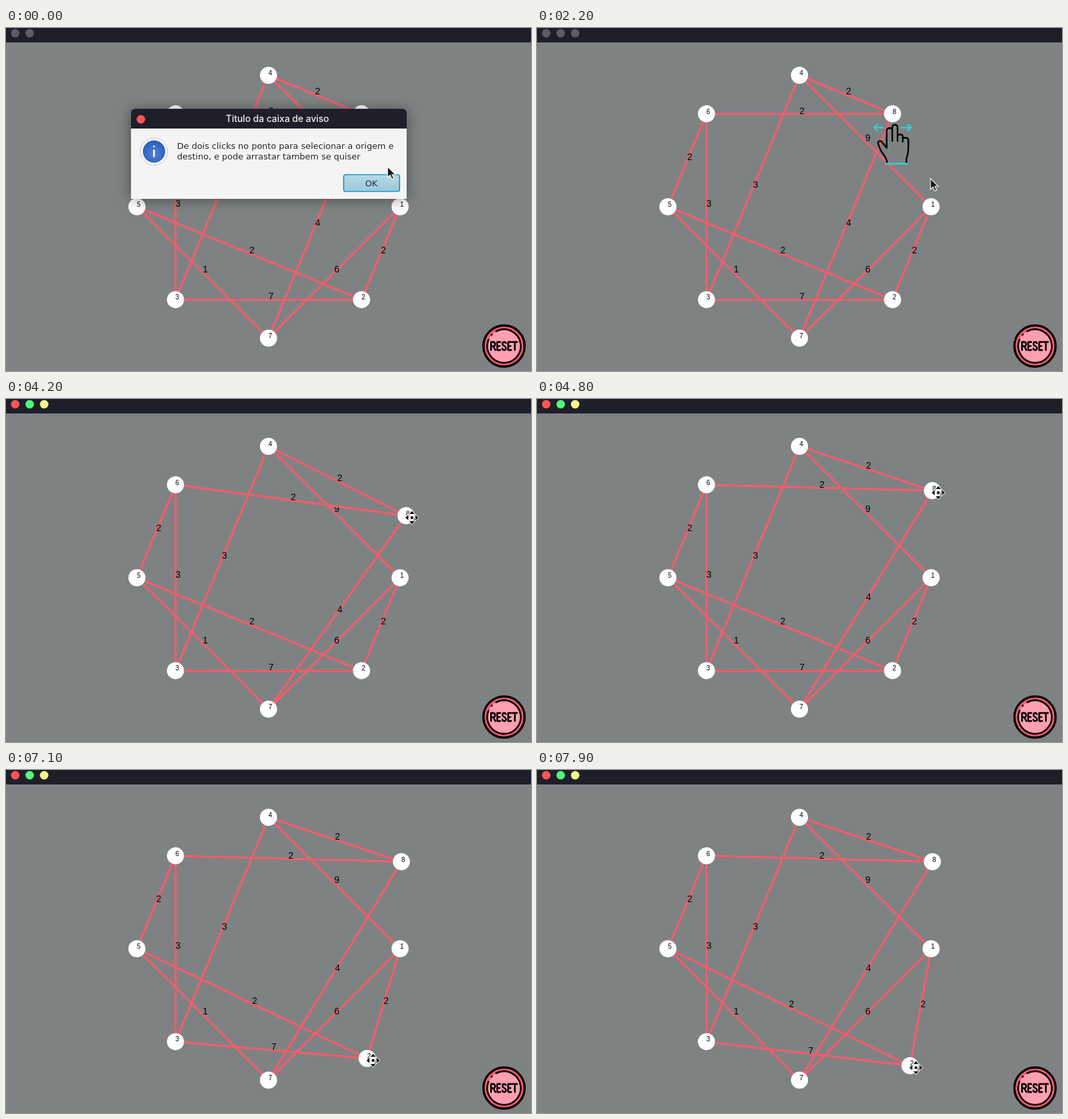
Write an HTML page that moves like this. It is 798 px wide and 522 px high and loops after 8000 ms.

```html
<!DOCTYPE html>
<html lang="pt">
<head>
<meta charset="utf-8">
<title>Grafo</title>
<style>
html, body { margin: 0; width: 100%; height: 100%; overflow: hidden; background: #7e8283; }
svg { display: block; width: 100vw; height: 100vh; }
.weight { font: 14px "Liberation Sans", sans-serif; }
.name { font: 10px "Liberation Sans", sans-serif; }
.title { font: 500 14px Inter, sans-serif; fill: #f4f4f2; text-anchor: middle; }
.msg { font: 13px "DejaVu Sans", sans-serif; fill: #22262a; }
.edge { stroke: #ff5a6c; stroke-width: 3; }
</style>
</head>
<body>
<svg viewBox="0 0 798 522" xmlns="http://www.w3.org/2000/svg">
  <defs>
    <linearGradient id="face" x2="0" y2="1">
      <stop id="faceTop"/><stop id="faceBottom" offset="1"/>
    </linearGradient>
    <radialGradient id="blue" cy=".6">
      <stop stop-color="#4f83d8"/><stop offset="1" stop-color="#3262bd"/>
    </radialGradient>
    <filter id="blur" x="-20%" y="-40%" width="140%" height="180%">
      <feGaussianBlur stdDeviation="10"/>
    </filter>
  </defs>
  <rect width="798" height="522" fill="#7e8283"/>
  <rect width="798" height="22" fill="#1f1f29"/>
  <g id="lights"></g>
  <g id="edges"></g>
  <g id="nodes"></g>

  <g id="reset" transform="translate(757 484)" fill="none" stroke="#000" stroke-linecap="round" stroke-linejoin="round">
    <circle r="31.300" fill="#ff5a72" stroke-width="3.400"/>
    <circle r="25.500" fill="#ff9fb0" stroke="none"/>
    <path d="M-12-22.500A25.500 25.500 0 1 1-23.500-10M-19-17L-18.500-17.500" stroke-width="2.600"/>
    <path aria-label="RESET" transform="scale(.94)" stroke-width="2.700" d="M-21 6.500V-6.500H-17.500Q-14.500-6.500-14.500-3T-17.500 .2H-21M-17.500 .2L-14 6.500
      M-6-6.500H-11V6.500H-6M-11 0H-7
      M3-4.500Q2.500-6.500 .3-6.500Q-2.500-6.500-2.500-3.500C-2.500 .5 3.200-.5 3.200 3.500Q3.200 6.500 .3 6.500Q-2.500 6.500-2.700 4
      M11.500-6.500H6.700V6.500H11.500M6.700 0H10.500M14-6.500H21M17.500-6.500V6.500"/>
  </g>

  <g id="hand" fill="none" stroke="#000" stroke-width="2.400" stroke-linejoin="round" stroke-linecap="round">
    <path d="M532 205C532 196 525 193 521 183L518.500 176C517.500 171.500 523 170.500 525 174.500L531.500 182.500V156
      C531.500 151 540 151 540 156V172M540 156V151C540 146 548 146 548 151V172M548 165C548 161 556 161 556 165V173
      M556 169C556 166 564.500 166 564.500 171C564.500 184 565 190 562.500 195Q561 199 561.500 205"/>
    <path d="M530 206.500H563M526 151.500H512.500M517 147L512.500 151.500L517 156M553.500 151.500H568.500M564 147L568.500 151.500L564 156" stroke="#35d0d3"/>
  </g>

  <g id="dialog">
    <rect x="190" y="125" width="419" height="136" fill="#000" opacity=".42" filter="url(#blur)"/>
    <path d="M190 260V129Q190 123 196 123H603Q609 123 609 129V260Z" fill="#f4f4f4"/>
    <path d="M190 153V129Q190 123 196 123H603Q609 123 609 129V153Z" fill="#1f1f29"/>
    <circle cx="205" cy="139" r="6.500" fill="#ff5555"/>
    <text class="title" x="412.500" y="143">Titulo da caixa de aviso</text>
    <circle cx="225" cy="188" r="20.500" fill="#fdfdfd" stroke="#c4c4c4"/>
    <circle cx="225" cy="188" r="17" fill="url(#blue)"/>
    <path d="M225 185V196.500M225 179V181.500" stroke="#fff" stroke-width="2.600"/>
    <text class="msg" x="260" y="184">De dois clicks no ponto para selecionar a origem e</text>
    <text class="msg" x="260" y="200">destino, e pode arrastar tambem se quiser</text>
    <rect x="513.250" y="223.250" width="85" height="25.500" rx="3" fill="url(#face)" stroke="#1f97c7" stroke-width="1.700"/>
    <text class="msg" x="555.500" y="241" text-anchor="middle">OK</text>
  </g>

  <path id="arrow" d="M0 0V16.500L3.900 13L6.600 19L9.400 17.800L6.800 12H12Z" fill="#1b1b1b" stroke="#fff" stroke-width="1.100"/>
  <g id="mover" fill="#111" stroke="#fff" stroke-width="1.500" paint-order="stroke">
    <circle r="2.300"/>
  </g>
</svg>
<script>
const LOOP = 8000, STEP = 100;
const CENTER = [399, 272], RADIUS = 200;
const $ = id => document.getElementById(id);

function add(parent, tag, attrs, text = "") {
  const el = document.createElementNS("http://www.w3.org/2000/svg", tag);
  set(el, attrs);
  el.textContent = text;
  return parent.appendChild(el);
}
function set(el, attrs) {
  for (const k in attrs) el.setAttribute(k, attrs[k]);
}
const show = (el, on) => set(el, { display: on ? "inline" : "none" });
const place = (el, [x, y]) => set(el, { transform: `translate(${x} ${y})` });
const clamp = v => Math.max(0, Math.min(1, v));
const easeOut = p => 1 - (1 - p) ** 3;

// Nodes sit clockwise on a circle, starting at the right.
const nodes = {};
[..."12735648"].forEach((id, i) => {
  const a = i * Math.PI / 4;
  const el = add($("nodes"), "g", {});
  add(el, "circle", { r: 13, fill: "#fff" });
  add(el, "text", { class: "name" }, id);
  const home = [CENTER[0] + RADIUS * Math.cos(a), CENTER[1] + RADIUS * Math.sin(a)];
  nodes[id] = { el, home, at: home };
});

// Each edge: start node, end node, weight.
const edges = "482 419 433 682 652 633 522 571 327 874 176 122".split(" ")
  .map(([from, to, weight]) => ({
    from: nodes[from], to: nodes[to],
    line: add($("edges"), "line", { class: "edge" }),
    label: add($("edges"), "text", { class: "weight" }, weight)
  }));

const lights = ["#ff5555", "#50fa7b", "#f4f98c"].map((color, i) => ({
  color, el: add($("lights"), "circle", { cx: 14 + 22 * i, cy: 8, r: 6.5 })
}));

for (let turn = 0; turn < 360; turn += 90)
  add($("mover"), "path", { d: "M0-10L4-5.500H-4Z", transform: `rotate(${turn})` });

// Pointer script: the pointer eases to each goal and rests there.
// A move with a drag carries that node along, held at the grab offset.
const GRAB = [9, 3];
const grip = id => nodes[id].home.map((v, i) => v + GRAB[i]);
const origin = [580, 211];
const moves = [
  { from: 0, to: 300, goal: [586, 235] },
  { from: 400, to: 500, goal: [566, 236] },
  { from: 1500, to: 2200, goal: [598, 229] },
  { from: 2200, to: 2500, goal: [566, 165] },
  { from: 2800, to: 3700, goal: grip(8) },
  { from: 3700, to: 4200, goal: [617, 180.5], drag: 8 },
  { from: 4200, to: 4900, goal: [610, 142.5], drag: 8 },
  { from: 5400, to: 6000, goal: [525, 421] },
  { from: 6100, to: 6300, goal: grip(2) },
  { from: 7000, to: 7100, goal: [558, 442], drag: 2 },
  { from: 7100, to: 7500, goal: [604, 461], drag: 2 },
  { from: 7500, to: 7900, goal: [576, 453], drag: 2 }
];

// Replays the script up to t; sets the node places, returns the pointer's.
function runScript(t) {
  let at = origin;
  for (const id in nodes) nodes[id].at = nodes[id].home;
  for (const { from, to, goal, drag } of moves) {
    if (t <= from) break;
    const p = easeOut(clamp((t - from) / (to - from)));
    at = at.map((v, i) => v + (goal[i] - v) * p);
    if (drag) nodes[drag].at = at.map((v, i) => v - GRAB[i]);
  }
  return at;
}

function drawGraph() {
  for (const id in nodes) place(nodes[id].el, nodes[id].at);
  for (const { from, to, line, label } of edges) {
    const [x1, y1] = from.at, [x2, y2] = to.at;
    set(line, { x1, y1, x2, y2 });
    set(label, { x: (x1 + x2) / 2, y: (y1 + y2) / 2 });
  }
}

function drawDialog(t) {
  const fade = clamp((t - 1400) / 300);
  const s = 1 - 0.15 * fade;
  const [top, bottom] = t >= 1200 ? ["#a9cfdf", "#92bccd"]
    : t >= 200 ? ["#c3e5f1", "#a9d4e5"] : ["#b4dae8", "#9bc8db"];
  set($("faceTop"), { "stop-color": top });
  set($("faceBottom"), { "stop-color": bottom });
  show($("dialog"), fade < 1);
  set($("dialog"), {
    opacity: 1 - fade,
    transform: `translate(${399.5 * (1 - s)} ${191.5 * (1 - s)}) scale(${s})`
  });
}

function draw(t) {
  const at = runScript(t);
  drawGraph();
  drawDialog(t);

  const active = t >= 3800;
  lights.forEach(({ el, color }) => set(el, { fill: active ? color : "#5d5c67" }));
  show(lights[2].el, t >= 1500);

  show($("hand"), t >= 1700 && !active);
  place($("hand"), [-6 * Math.sin((t - 2200) / 1200 * 2 * Math.PI), 0]);

  const moving = (t >= 3500 && t < 5500) || t >= 6300;
  show($("arrow"), !moving);
  show($("mover"), moving);
  place($("arrow"), at);
  place($("mover"), at);
}

const start = performance.now();
function tick() {
  const t = (performance.now() - start) % LOOP;
  draw(Math.floor(t / STEP) * STEP);
  requestAnimationFrame(tick);
}
tick();
</script>
</body>
</html>
```
